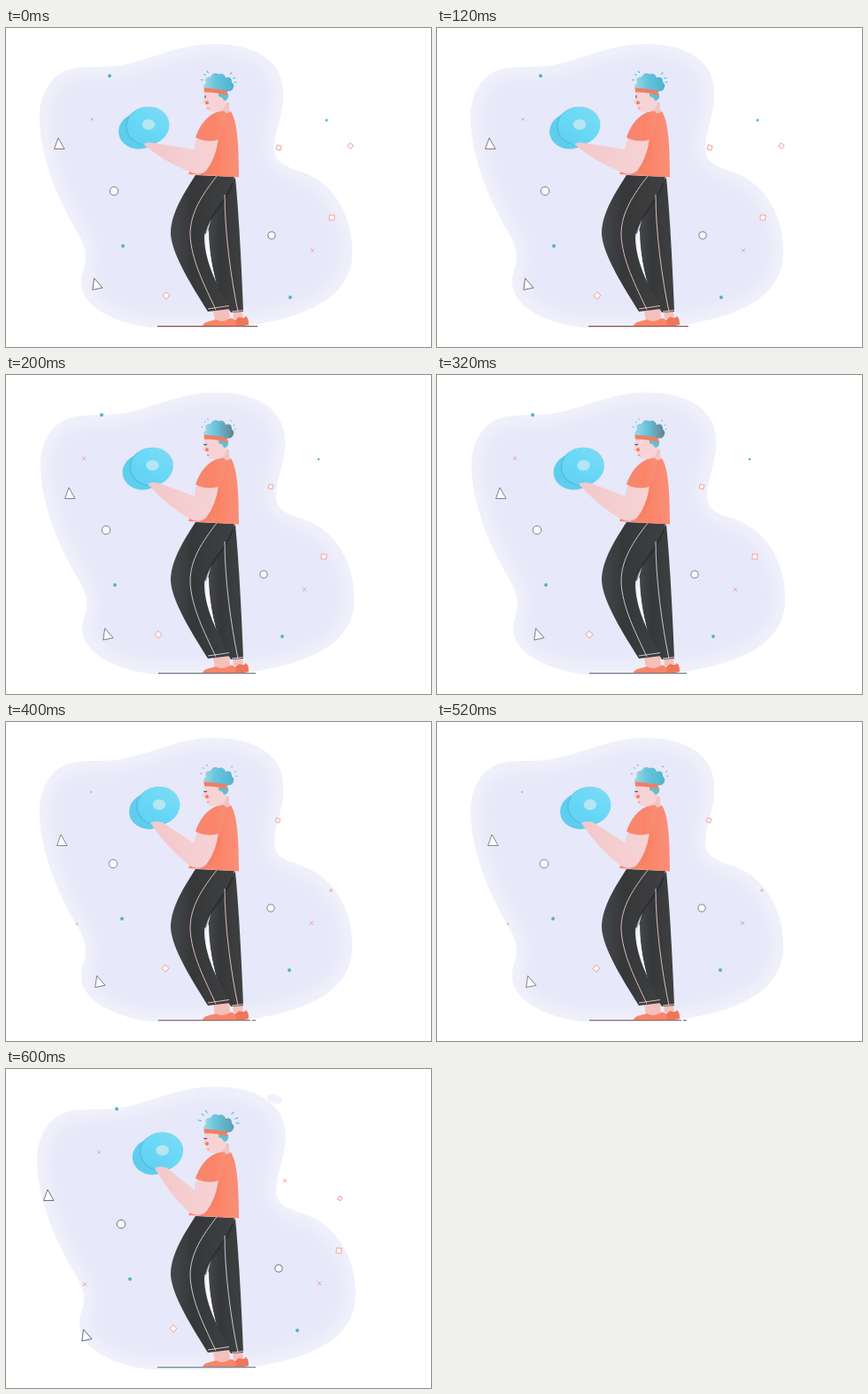
Recreate the animation shown at these times as an HTML page. Size 480 by 360 pixels, loop 0.8 s.

```html
<!DOCTYPE html>
<html lang="en">
<head>
<meta charset="utf-8">
<title>Dumbbell curl</title>
<style>
html, body { margin: 0; width: 100%; height: 100%; overflow: hidden; background: #fff; }
svg { display: block; width: 100vw; height: 100vh; }
</style>
</head>
<body>
<svg viewBox="0 0 480 360">
  <defs>
    <path id="shape" d="M38 105C37 76 50 49 80 45C98 43 112 45 130 42C165 36 195 18 235 18C280 18 311 36 313 70C315 96 303 113 303 138C304 159 332 158 350 170C378 188 391 220 391 253C391 298 352 322 285 334C255 339 195 338 165 338C125 334 86 315 85 288C84 276 90 272 90 258C90 246 84 236 78 226C59 192 40 150 38 105Z"/>
    <clipPath id="inside"><use href="#shape"/></clipPath>
    <filter id="soft" x="-20%" y="-20%" width="140%" height="140%"><feGaussianBlur stdDeviation="9"/></filter>
    <filter id="shade"><feGaussianBlur stdDeviation="2.5"/></filter>
    <linearGradient id="disc" x1="0" y1="1" x2="1" y2="0">
      <stop offset="0" stop-color="#5fd0f2"/><stop offset=".6" stop-color="#6cd9f7"/><stop offset="1" stop-color="#86daf0"/>
    </linearGradient>
    <linearGradient id="shirt">
      <stop offset="0" stop-color="#f58770"/><stop offset=".6" stop-color="#fb8468"/><stop offset="1" stop-color="#f98f78"/>
    </linearGradient>
    <linearGradient id="leg">
      <stop offset="0" stop-color="#45474a"/><stop offset=".35" stop-color="#353739"/><stop offset="1" stop-color="#3e4042"/>
    </linearGradient>
    <linearGradient id="skin">
      <stop offset="0" stop-color="#f3c8ca"/><stop offset="1" stop-color="#f6d3d5"/>
    </linearGradient>
    <linearGradient id="hair">
      <stop offset="0" stop-color="#9fd8e6"/><stop offset=".4" stop-color="#67c5dd"/><stop offset="1" id="hairEnd"/>
    </linearGradient>
  </defs>

  <g id="blob">
    <use href="#shape" fill="#e7e8f9"/>
    <g clip-path="url(#inside)">
      <use href="#shape" fill="none" stroke="#fff" stroke-width="24" opacity=".42" filter="url(#soft)"/>
    </g>
  </g>
  <g id="bits" fill="none" stroke-width=".9"></g>
  <path id="ground"/>

  <g id="weight">
    <ellipse cx="-9.5" cy="6" rx="24" ry="20.5" fill="#5fcdee" transform="rotate(-8 -9.5 6)"/>
    <ellipse rx="24.3" ry="21.5" fill="#52bfe0" transform="translate(-1.2 .6) rotate(-8)"/>
    <ellipse rx="24" ry="21.3" fill="url(#disc)" transform="rotate(-8)"/>
    <ellipse cx=".5" cy="-1" rx="7.3" ry="6" fill="#b5e6f2"/>
  </g>

  <g id="legs">
    <path d="M234 318L252 316 253 330 236 331ZM256 319L267 319 268 328 257 328Z" fill="#f4c0bb"/>
    <path d="M256 336C256 331 260 328 264 326Q269 329 271 325C274 328 274 331 274 335Q266 337 256 336Z" fill="#ee7659"/>
    <path d="M222 336C224 331 231 331 237 329Q245 333 254 327.5C259 328 261 332 259 336Z" fill="#fb8468"/>
    <path d="M240 185L259 169C263 210 266 270 268 320L254 321L241 300C234 278 229 252 228 229Z" fill="url(#leg)"/>
    <path d="M229 227C222 246 228 272 241 300C234 278 229 252 229 227Z" fill="#f9f9fe"/>
    <path d="M214 166C204 182 186 208 186 232C187 256 212 294 228 320L253 317C238 290 224 262 224 236C226 215 250 195 258 168Z" fill="url(#leg)"/>
    <path d="M256 175C247 200 228 212 225 232" fill="none" stroke="#222426" stroke-width="2" opacity=".6"/>
    <path id="stripes" fill="none" stroke-width="1" d="M238 167C222 188 208 208 208 233C209 262 225 292 237 318M247 188C247 230 254 282 262 320M228 317L252 313.5M255 320L268 318.5"/>
  </g>

  <g id="body">
    <path d="M240 84L252 84Q251 94 256 99Q247 102 240 97Z" fill="#f2c4c4"/>
    <path d="M243 95Q250 98 254 94C260 104 263 122 263 168.5L206 165 223 128Z" fill="url(#shirt)"/>
    <path d="M240 128Q240 148 227 163" fill="none" stroke="#e96f55" stroke-width="3" opacity=".35" filter="url(#shade)"/>
    <path id="arm" fill="url(#skin)"/>
    <path d="M245 93.5C233 94 220 105 214 123.5Q226 130 240 126Q249 112 248 95Z" fill="url(#shirt)"/>
    <path d="M224 71L249 75C250 85 248 93 239 95Q230 95 227 92.5L226 87 221.5 84 224 79Z" fill="#f6d3d5"/>
    <circle cx="227" cy="84.3" r="2" fill="#f4796b"/>
    <path d="M227 90.5H229.5" stroke="#e58b86"/>
    <path id="eye" fill="none" stroke="#3b5660" stroke-width="1.1"/>
    <path d="M240 74L251 74Q252 82 246 82Q245 78 240 77Z" fill="#62bfd5"/>
    <path d="M226 70Q220 66 226 62Q223 55 231 55Q234 49 240 52Q246 50 248 56Q255 54 255 61Q260 66 254 71Q240 74 226 70Z" fill="url(#hair)"/>
    <path d="M223.5 67.5Q237 68 250 71L249.5 76Q237 72 224 72.5Z" fill="#f47d61"/>
    <path id="drops" fill="none" stroke="#62c5de" stroke-width="1.3" stroke-linecap="round"/>
  </g>
</svg>

<script>
const $ = id => document.getElementById(id);
const set = (id, attrs) => { for (const k in attrs) $(id).setAttribute(k, attrs[k]); };

const drift = [[0, 0], [-9, -9], [-1, -24], [8, -9]];

// kind, x, y, size in each pose (0 = hidden), turn in degrees
const bits = [
  ["dot", 117, 54, [2, 2, 0, 2]],
  ["dot", 362, 104, [1.5, 1.2, 0, 0]],
  ["dot", 132, 246, [2, 1.9, 2, 2]],
  ["dot", 321, 304, [2, 1.9, 2, 2]],
  ["cross", 97, 103, [1.5, 2, 1, 1.7]],
  ["cross", 346, 251, [2, 2.3, 2.2, 2.5]],
  ["cross", 81, 252, [0, 0, 1.3, 2.3]],
  ["cross", 307, 135, [0, 0, 0, 2.2]],
  ["ring", 122, 184, [4.8, 4.8, 4.8, 4.8]],
  ["ring", 300, 234, [4.1, 4.1, 4.1, 4.1]],
  ["box", 308, 135, [2.6, 2.5, 2.3, 0], 15],
  ["box", 389, 133, [2.4, 0, 0, 0], 35],
  ["box", 368, 214, [2.9, 2.9, 1, 2.9], 5],
  ["box", 369, 155, [0, 0, 0, 2], 30],
  ["box", 181, 302, [2.9, 2.9, 2.9, 2.9], 40]
];

const triangles = [
  [[60, 131], [72, 134], [63, 134], [48, 143]],
  [[102, 289], [114, 292.5], [105, 293], [90, 300.5]]
];

const poses = [
  { blob: "", weight: [160.5, 110], hand: [155, 131], ink: "#806b75", seam: "#dfbcba", ground: "#70342f",
    hair: "#4cb3cd", spray: 18, drop: 2, line: "M171 336.7H284", eye: "M225 76V79" },
  { blob: "translate(1 1.8) scale(1.003 .993)", weight: [165, 103], hand: [160, 123], ink: "#77778a", seam: "#c8c8cc", ground: "#555a70",
    hair: "#64828c", spray: 18.5, drop: .5, line: "M172 336.7H282", eye: "M223.5 78Q225 79.5 227 78" },
  { blob: "", weight: [172.5, 94.3], hand: [163, 114], ink: "#837a7e", seam: "#dcbcba", ground: "#7b4b52",
    hair: "#50b5cc", spray: 20, drop: .9, line: "M172 336.7H276M278 336.7H282", eye: "M223.5 78Q225 79.5 227 78" },
  { blob: "translate(-3.7 2) scale(1.019 .997)", weight: [176.2, 92.7], hand: [168, 112], ink: "#596875", seam: "#c8ccd0", ground: "#477785",
    hair: "#5d9eac", spray: 20, drop: 3.2, line: "M171 336.7H282", eye: "M223.5 78Q225 79.5 227 78" }
];

function drawBit([kind, x, y, sizes, turn = 0], pose, ink) {
  const s = sizes[pose];
  if (!s) return "";
  const at = `transform="translate(${x + drift[pose][0]} ${y + drift[pose][1]}) rotate(${turn})"`;
  switch (kind) {
    case "dot": return `<circle ${at} r="${s}" fill="#50b4c8"/>`;
    case "ring": return `<circle ${at} r="${s}" fill="#fbfbff" stroke="${ink}"/>`;
    case "box": return `<rect ${at} x="${-s}" y="${-s}" width="${2 * s}" height="${2 * s}" fill="#fff7f6" stroke="#efa19a"/>`;
    case "cross": return `<path ${at} d="M${-s} ${-s}L${s} ${s}M${-s} ${s}L${s} ${-s}" stroke="#f0a39b"/>`;
  }
}

function drawTriangle(places, i, pose, ink) {
  const turn = i ? -12 : 0;
  return `<path transform="translate(${places[pose]}) rotate(${turn})" d="M-1 -7L6 5.5H-5.5Z" fill="#fcfcff" stroke="${ink}"/>`;
}

function armPath([x, y]) {
  const bend = [(x + 207) / 2 - 3, (y + 162) / 2 + 4];
  return `M${x} ${y}Q${bend} 207 162Q218 168 226 161Q237 147 240 125L217 121Q213 130 213 137` +
    `L${x + 13} ${y - 1}Q${x + 4} ${y - 3} ${x} ${y}Z`;
}

function spray(radius, length) {
  return [-168, -145, -130, -42, -20, -3].map(deg => {
    const a = deg * Math.PI / 180, c = Math.cos(a), s = Math.sin(a);
    const point = r => `${240 + r * c} ${62 + r * s * .85}`;
    return `M${point(radius)}L${point(radius + length)}`;
  }).join("");
}

function show(pose) {
  const p = poses[pose];
  set("blob", { transform: p.blob });
  set("weight", { transform: `translate(${p.weight})` });
  set("arm", { d: armPath(p.hand) });
  set("ground", { d: p.line, stroke: p.ground });
  set("stripes", { stroke: p.seam });
  set("hairEnd", { "stop-color": p.hair });
  set("drops", { d: spray(p.spray, p.drop) });
  set("eye", { d: p.eye });
  $("bits").innerHTML = bits.map(b => drawBit(b, pose, p.ink)).join("") +
    triangles.map((t, i) => drawTriangle(t, i, pose, p.ink)).join("") +
    (pose === 3 ? '<ellipse cx="303.5" cy="34" rx="9" ry="5" transform="rotate(18 303.5 34)" fill="#f1f1fb"/>' : "");
}

let current = -1;
function tick() {
  const pose = Math.floor(performance.now() % 800 / 200);
  if (pose !== current) show(current = pose);
  requestAnimationFrame(tick);
}
tick();
</script>
</body>
</html>
```
